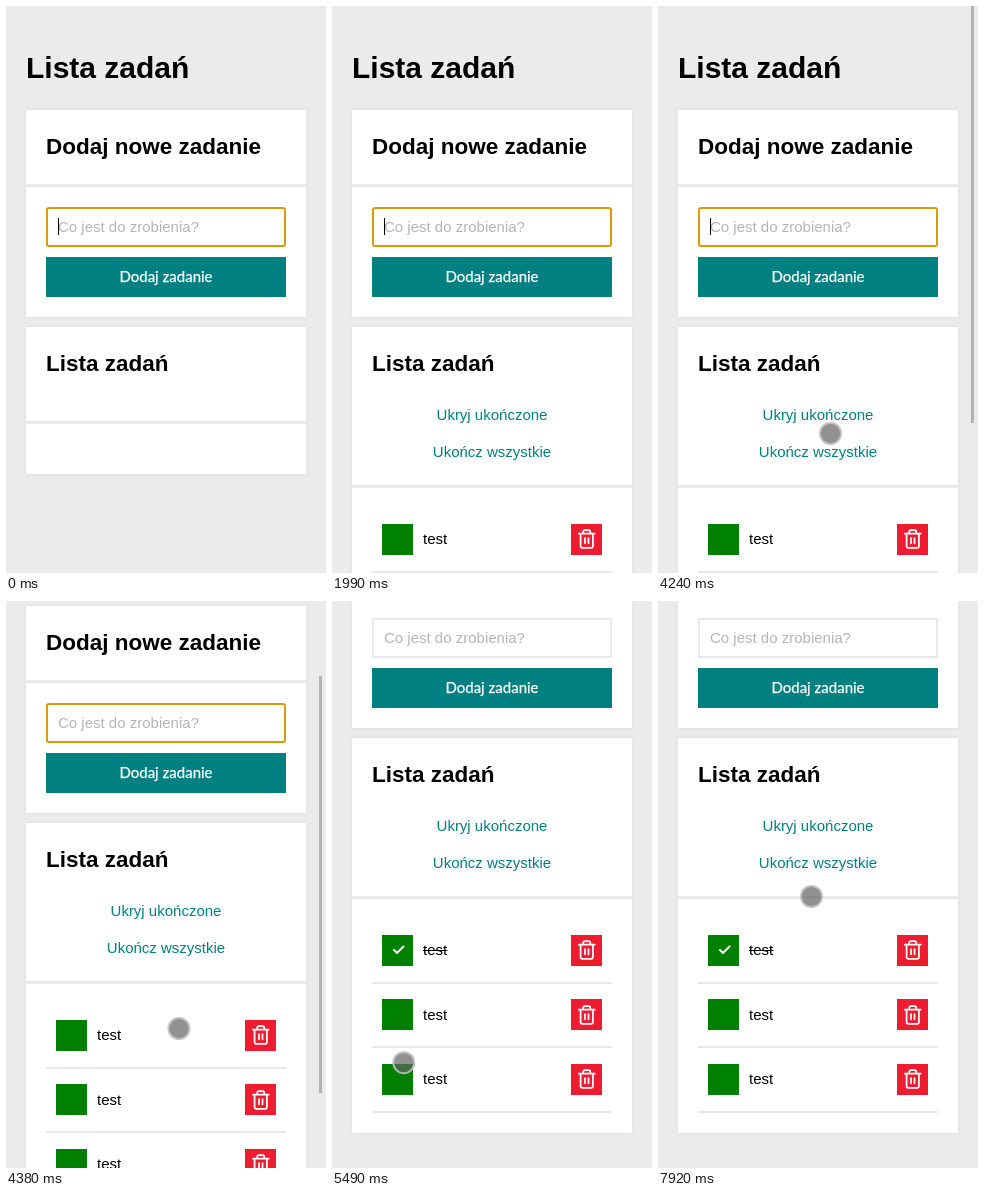
Write an HTML page that moves like this. It is 320 px wide and 567 px high and loops after 7.99 s.

```html
<!DOCTYPE html>
<html lang="pl">
<meta charset="utf-8">
<title>Lista zadań</title>
<style>
  html, body { margin: 0; width: 100%; height: 100%; overflow: hidden; background: #ebebeb; }
  svg { display: block; width: 100%; height: 100%; font: 15px "Liberation Sans", Arial, sans-serif; }
  .card { fill: #fff; filter: drop-shadow(0 0 2px #ddd); }
  .rule { fill: #e9e9e9; }
  .head { font-weight: bold; font-size: 22.5px; }
  .link { fill: teal; text-anchor: middle; }
  .icon { fill: none; stroke: #fff; stroke-width: 2; stroke-linecap: round; stroke-linejoin: round; }
</style>
<svg viewBox="0 0 320 567">
  <g id="page">
    <text x="20" y="72" font-weight="bold" font-size="30">Lista zadań</text>
    <rect class="card" x="20" y="104" width="280" height="207"/>
    <rect class="rule" x="20" y="178" width="280" height="3"/>
    <text class="head" x="40" y="148">Dodaj nowe zadanie</text>
    <rect id="field" x="41" y="202" width="238" height="38" fill="#fff" stroke-width="2"/>
    <text id="value" x="52" y="226"></text>
    <rect id="caret" y="212" width="1" height="17"/>
    <rect x="40" y="251" width="240" height="40" fill="teal"/>
    <text x="160" y="276" fill="#fff" stroke="#fff" stroke-width=".25" text-anchor="middle" font-family="Lato, sans-serif">Dodaj zadanie</text>

    <rect id="list" class="card" x="20" y="321" width="280"/>
    <rect id="divider" class="rule" x="20" width="280" height="3"/>
    <text class="head" x="40" y="365">Lista zadań</text>
    <g id="links">
      <text class="link" x="160" y="414">Ukryj ukończone</text>
      <text class="link" x="160" y="451">Ukończ wszystkie</text>
    </g>
    <g id="rows"></g>
  </g>
  <rect id="thumb" x="313" width="3" height="417" fill="#b3b3b3"/>
  <circle id="touch" r="10.5" fill="#636363" fill-opacity=".7" stroke="#bcc0bf" stroke-opacity=".9" stroke-width="2"/>
</svg>
<script>
const LOOP = 7990, WORD = 'test', LETTER = 145, BLINK = 530, ROW = 64.5;
const $ = id => document.getElementById(id);
const set = (id, attrs) => { for (const k in attrs) $(id).setAttribute(k, attrs[k]); };
const show = (el, on) => el.setAttribute('visibility', on ? 'visible' : 'hidden');
const within = (t, [a, b]) => t >= a && t < b;
const clamp = (v, max) => Math.max(0, Math.min(max, v));
const ease = u => (1 - Math.cos(Math.PI * clamp(u, 1))) / 2;

const tasks = [
  { typed: 130, sent: 920, done: [5300, LOOP] },
  { typed: 1330, sent: 1990, done: [5890, 7050] },
  { typed: 2380, sent: 3040, done: [LOOP, LOOP] }
];
const blur = tasks[0].done[0];

// Where the pointer comes to rest, and when; it enters from the right
const entry = { x: 556, y: 300 };
const stops = [
  { t: 4050, x: 172, y: 427 },
  { t: 4733, x: 175, y: 427 },
  { t: 5250, x: 66, y: 354 },
  { t: 5530, x: 72, y: 476 },
  { t: 5800, x: 69, y: 417 },
  { t: 6080, x: 93, y: 409 },
  { t: 7060, x: 69, y: 406 },
  { t: 7930, x: 153, y: 295 }
];

function pointer(t) {
  let { x, y } = entry, last = 0;
  for (const s of stops) {
    const time = Math.min(450, s.t - last), u = ease((t - s.t + time) / time);
    x += (s.x - x) * u;
    y += (s.y - y) * u;
    last = s.t;
  }
  return { cx: x + .5, cy: y + .5 };
}

// Two turns of the wheel
const scrollAt = t => Math.round(99 * ease((t - 4200) / 200) + 85 * ease((t - 4430) / 320));

$('rows').innerHTML = tasks.map((_, i) => `
  <g>
    <g transform="translate(0 ${Math.floor(ROW * i)})">
      <rect x="50" y="518" width="31" height="31" fill="green"/>
      <rect x="239" y="518" width="31" height="31" fill="#ee1c30"/>
      <rect class="rule" x="40" y="565" width="240" height="2"/>
    </g>
    <g transform="translate(0 ${Math.round(ROW * i)})">
      <text x="91" y="538">${WORD}</text>
      <path class="icon" transform="translate(244.2 522.4) scale(.88)"
        d="M3 6h18M19 6v14a2 2 0 0 1-2 2H7a2 2 0 0 1-2-2V6M8 6V4a2 2 0 0 1 2-2h4a2 2 0 0 1 2 2v2M10 11v6M14 11v6"/>
      <g class="mark">
        <path class="icon" d="M62 533l3 3 6.500-6.500"/>
        <path d="M91 533.5h24.500" stroke="#000"/>
      </g>
    </g>
  </g>`).join('');
const rows = [...$('rows').children];

function draw(t) {
  const count = tasks.filter(k => t >= k.sent).length;
  const task = tasks[count];
  const typed = task ? clamp(Math.floor((t - task.typed) / LETTER) + 1, WORD.length) : 0;
  const focus = t < blur;
  $('value').textContent = typed ? WORD.slice(0, typed) : 'Co jest do zrobienia?';
  set('value', { fill: typed ? '#000' : '#b5b5b5' });
  set('field', { stroke: focus ? '#dc9a06' : '#e9e9e9', rx: focus ? 2 : 0 });
  set('caret', { x: 52 + (typed && Math.floor($('value').getComputedTextLength())) });
  show($('caret'), focus && (typed || Math.floor((t - 3300) / BLINK) % 2));

  set('list', { height: count ? Math.floor(201.5 + ROW * count) : 147 });
  set('divider', { y: count ? 479 : 415 });
  show($('links'), count);
  rows.forEach((row, i) => {
    row.setAttribute('display', i < count ? 'inline' : 'none');
    row.querySelector('.mark').setAttribute('display', within(t, tasks[i].done) ? 'inline' : 'none');
  });

  // Movement advances at 15 steps a second
  const step = Math.floor(t * .015 + .32) / .015;
  const scroll = scrollAt(step);
  set('page', { transform: `translate(0 ${-scroll})` });
  set('thumb', { y: Math.round(scroll * .755) });
  show($('thumb'), within(t, [4240, 4790]));
  set('touch', pointer(step));
}

const start = performance.now();
function frame() {
  draw((performance.now() - start) % LOOP);
  requestAnimationFrame(frame);
}
frame();
</script>
</html>
```
